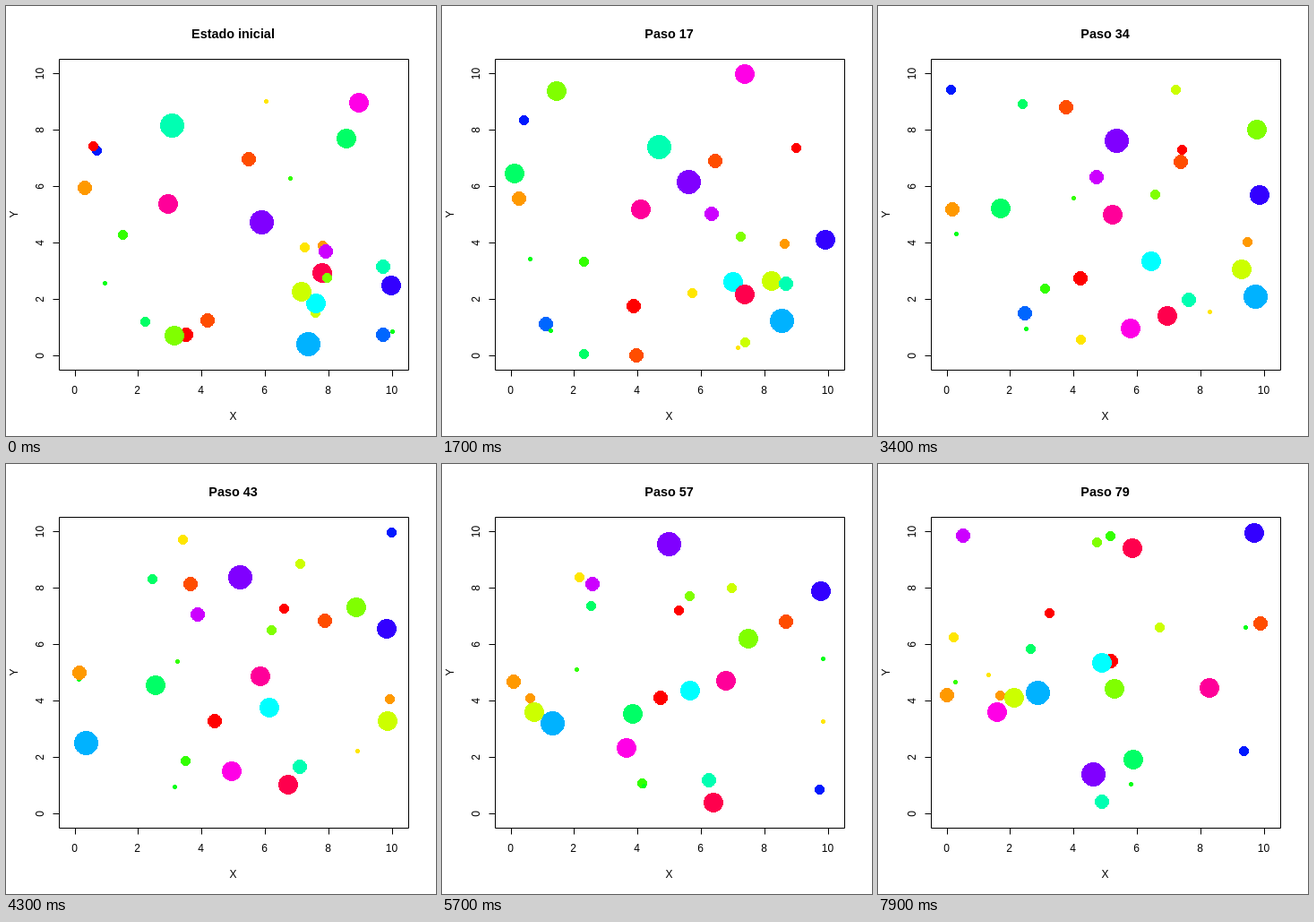
An HTML page that plays this animation: 480x480 px, repeating every 8000 ms.

```html
<!DOCTYPE html>
<html lang="es">
<head>
<meta charset="utf-8">
<title>Estado inicial</title>
<style>
  html, body { margin: 0; height: 100%; overflow: hidden; background: #fff; }
  svg { display: block; width: 480px; height: 480px; }
  text { font: 12px "Liberation Sans", Arial, sans-serif; text-anchor: middle; }
  #title { font-size: 14.4px; font-weight: bold; }
  #axes { fill: none; stroke: #000; }
  circle { shape-rendering: crispEdges; }
</style>
</head>
<body>
<svg viewBox="0 0 480 480">
  <g id="dots"></g>
  <path id="axes"/>
  <g id="labels">
    <text id="title" x="253.5" y="36"></text>
    <text x="253.5" y="462">X</text>
    <text transform="translate(13 232.5) rotate(-90)">Y</text>
  </g>
</svg>
<script>
const STEP = 100, STEPS = 80, LAST = STEPS - 1;
// Pixel position of 0 and pixels per unit; the world is a 10 by 10 torus.
const X0 = 77, Y0 = 390.5, UX = 35.43, UY = 31.55;

// Each body drifts in a straight line: start x, y, total shift x, y,
// and, if it is lost in a collision, the step at which that happens.
const bodies = [
  [201, 367, 59, -147], [271, 171, 156, 7], [353, 267, 137, -9],
  [290, 106, 187, -187], [345, 342, -31, 155], [188, 368, -278, 198],
  [317, 192, -231, 51], [110, 309, -54, -127], [380, 148, 259, 182],
  [185, 133, 263, 112, 25], [346, 332, -96, -110], [337, 377, 195, -122],
  [421, 367, 227, -56, 43], [101, 161, -47, -157], [430, 312, -10, -235],
  [285, 241, -45, -211], [357, 274, -262, -194], [394, 108, -261, -147],
  [181, 221, 189, 29], [353, 298, -69, 111], [97, 156, -260, 10],
  [225, 351, -35, 181, 48], [88, 203, -11, 55], [333, 269, -249, 239],
  [330, 319, 176, -58], [358, 303, -114, -216], [130, 255, 129, 140],
  [431, 363, 205, -6], [155, 352, 15, 169], [421, 291, -171, 86]
];
const sizes = "332124114545324534442332422123";
const diameter = i => Math.round(sizes[i] * 5.4);

const $ = id => document.getElementById(id);

function add(parent, tag, attrs, text = "") {
  const el = document.createElementNS("http://www.w3.org/2000/svg", tag);
  for (const key in attrs) el.setAttribute(key, attrs[key]);
  el.textContent = text;
  return parent.appendChild(el);
}

const wrap = (value, low, span) => low + ((value - low) % span + span) % span;

let axes = "M59.5 59.5H449.5V406.5H59.5Z";
for (let v = 0; v <= 10; v += 2) {
  const x = Math.floor(X0 + v * UX) + .5, y = Math.floor(Y0 - v * UY) + .5;
  axes += `M${x} 406.5v7M59.5 ${y}h-7`;
  add($("labels"), "text", { x: x - 1, y: 433 }, v);
  add($("labels"), "text", { transform: `translate(42 ${y}) rotate(-90)` }, v);
}
$("axes").setAttribute("d", axes);

const dots = bodies.map((_, i) => add($("dots"), "circle", {
  r: diameter(i) / 2,
  fill: `hsl(${i % 20 * 18}, 100%, 50%)`
}));

function show(n) {
  $("title").textContent = n ? "Paso " + n : "Estado inicial";
  bodies.forEach(([x, y, dx, dy, life = STEPS], i) => {
    const dot = dots[i];
    // Odd diameters are centred on a pixel, even ones between two.
    const snap = value => Math.round(value) + diameter(i) % 2 / 2;
    dot.setAttribute("cx", snap(wrap(x + dx * n / LAST, X0, 10 * UX)));
    dot.setAttribute("cy", snap(wrap(y + dy * n / LAST, Y0 - 10 * UY, 10 * UY)));
    dot.style.display = n < life ? "" : "none";
  });
}

const start = performance.now();
function tick() {
  show(Math.floor((performance.now() - start) / STEP) % STEPS);
  requestAnimationFrame(tick);
}
tick();
</script>
</body>
</html>
```
